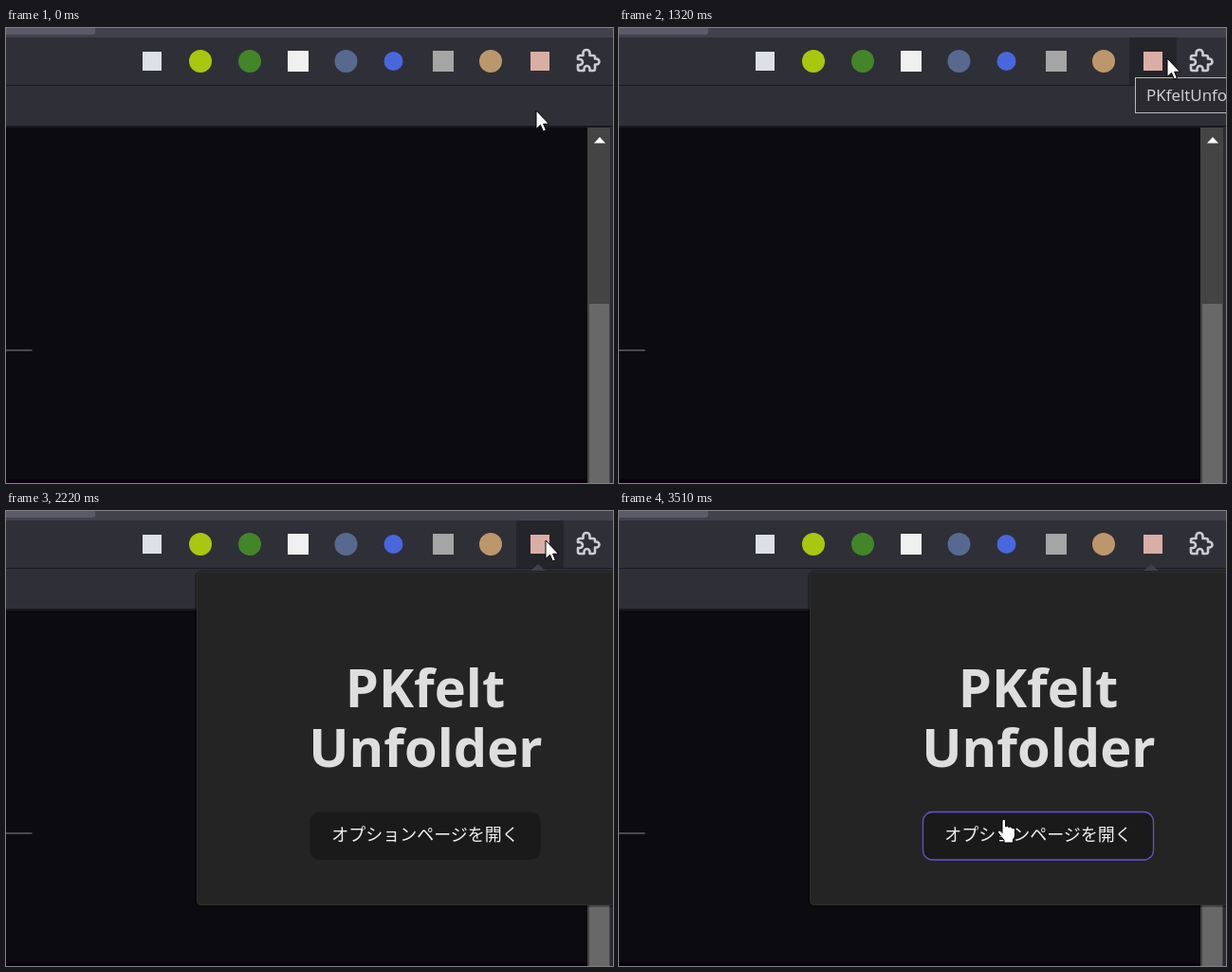
Recreate the animation shown at these times as an HTML page. Size 640 by 480 pixels, loop 3800 ms.

```html
<!DOCTYPE html>
<html lang="ja">
<head>
<meta charset="utf-8">
<title>Extension popup</title>
<style>
  html, body { margin: 0; width: 100%; height: 100%; overflow: hidden; background: #0c0b10; }
  svg { display: block; width: 100%; height: 100%; }
  .title { font: bold 56px "Open Sans", sans-serif; fill: #dedede; text-anchor: middle; }
  .label { font: 18px "Noto Sans CJK JP", "Noto Sans CJK", sans-serif; fill: #f0f0f0; text-anchor: middle; }
  .tip { font: 17px "Open Sans", sans-serif; fill: #d6d6da; }
</style>
</head>
<body>
<svg viewBox="0 0 640 480">
  <!-- browser chrome -->
  <rect width="640" height="10" fill="#42414c"/>
  <path d="M0 0H94V4Q94 7 91 7H0Z" fill="#5b5a66"/>
  <rect y="10" width="640" height="94" fill="#2f2f37"/>
  <rect y="60" width="640" height="1" fill="#1c1b21"/>
  <rect id="hover" y="10" height="50" fill="#24242b"/>

  <!-- toolbar icons -->
  <rect x="144" y="25" width="20" height="20" fill="#dde0e4"/>
  <circle cx="205" cy="35" r="12" fill="#a9c70f"/>
  <circle cx="257" cy="35" r="12" fill="#438529"/>
  <rect x="297" y="24" width="22" height="22" fill="#f0f0f0"/>
  <circle cx="358.500" cy="35" r="12" fill="#586990"/>
  <circle cx="408.500" cy="35" r="10" fill="#4967dc"/>
  <rect x="450" y="24" width="22" height="22" fill="#a5a5a5"/>
  <circle cx="511" cy="35" r="12" fill="#bd976c"/>
  <rect x="553" y="25" width="20" height="20" fill="#d9aea5"/>
  <path fill="none" stroke="#cbcbd1" stroke-width="2.6" stroke-linejoin="round"
    d="M603 33V31Q603 29 605 29H608.500V26.500a3.500 3.500 0 0 1 7 0V29H619q2 0 2 2V32.500H622.500a3 3 0 0 1 0 6H621V43q0 2-2 2H615.500V43a3 3 0 0 0-6 0V45H605q-2 0-2-2V39h2a3 3 0 0 0 0-6Z"/>

  <!-- page and scrollbar -->
  <rect y="103" width="640" height="377" fill="#19181e"/>
  <rect y="105" width="613" height="371" fill="#0c0b10"/>
  <rect y="476" width="613" height="4" fill="#0c0010"/>
  <rect y="339.500" width="27.500" height="1" fill="#858588"/>
  <rect x="613" y="105" width="24" height="375" fill="#444"/>
  <rect x="615" y="291" width="21" height="189" fill="#686868"/>
  <rect x="637" y="104" width="3" height="376" fill="#2b2a33"/>
  <path d="M620 121.500L626 115L632 121.500Z" fill="#fff"/>

  <!-- tooltip -->
  <g id="tooltip">
    <rect x="544.500" y="52.500" width="190" height="37" fill="#2b2a30" stroke="#b9b9bd"/>
    <text class="tip" x="556" y="77">PKfeltUnfolder</text>
  </g>

  <!-- popup -->
  <g id="frame" fill="none">
    <rect x="200" y="63.500" width="460" height="353.500" rx="6" stroke="#000" stroke-opacity=".3" stroke-width="2"/>
    <rect x="201.500" y="65" width="460" height="350.500" rx="4" stroke="#1d1d22"/>
    <path d="M553 63L561 56L569 63Z" fill="#414048"/>
  </g>
  <g id="popup">
    <rect x="201.500" y="64.500" width="460" height="351" rx="4" fill="#242424" stroke="#2d2d2f"/>
    <text class="title" x="442" y="207">PKfelt</text>
    <text class="title" x="442.500" y="270">Unfolder</text>
    <rect id="button" x="320.500" y="317.500" width="243" height="50.500" rx="10" fill="#1a1a1a" stroke="#6b4fcb" stroke-width="1.300"/>
    <text class="label" x="442" y="348">オプションページを開く</text>
  </g>

  <!-- pointers, tip at the origin -->
  <path id="arrow" fill="#fff" stroke="#000" stroke-width="1" d="M0 0V19.500L4.500 15.300L7.400 22L10.400 20.700L7.600 14.200H13.500Z"/>
  <path id="hand" fill="#fff" stroke="#000" stroke-width="1"
    d="M0 1.500Q1.800-1 3.600 1.500V8Q5.500 6.500 7 8.500Q9 7.300 10.300 9.500Q13 8.700 13.500 11.500V17Q13.500 19.500 11.500 21.500V25H2V22Q-1 19-4.500 14Q-5 11.500-2.500 12L0 14.500Z"/>
</svg>
<script>
const LOOP = 3800, STEP = 30;
const TOOLTIP_ON = 1320, CLICK = 2040, POPUP_ON = 2220, BUTTON_ENTER = 3210;

const smooth = u => u * u * (3 - 2 * u);
const linear = u => u;
const slowDown = u => 1 - (1 - u) ** 1.5;
const clamp = u => Math.min(1, Math.max(0, u));
const progress = (t, from, to) => clamp((t - from) / (to - from));

// Each move: start, end, destination, easing
const START = [559, 87];
const MOVES = [
  [0, 360, [595, 34], smooth],
  [510, 660, [578, 32], smooth],
  [1560, 1650, [569, 31], smooth],
  [2670, 2790, [516, 107], linear],
  [2790, 3210, [404, 325], slowDown],
];

const el = id => document.getElementById(id);
const [hover, tooltip, frame, popup, button, arrow, hand] =
  ["hover", "tooltip", "frame", "popup", "button", "arrow", "hand"].map(el);
const show = (node, on) => node.setAttribute("visibility", on ? "visible" : "hidden");

function pointerAt(t) {
  return MOVES.reduce(([x, y], [from, to, [endX, endY], ease]) => {
    const u = ease(progress(t, from, to));
    return [x + (endX - x) * u, y + (endY - y) * u];
  }, START);
}

function draw(now) {
  const t = Math.floor((now % LOOP) / STEP) * STEP;
  const [x, y] = pointerAt(t);
  const onButton = t >= BUTTON_ENTER;

  show(hover, y < 60);
  hover.setAttribute("x", x < 588 ? 538 : 588);
  hover.setAttribute("width", x < 588 ? 50 : 52);

  show(tooltip, t >= TOOLTIP_ON && t < CLICK);
  frame.setAttribute("opacity", progress(t, CLICK + STEP, POPUP_ON - STEP));
  show(popup, t >= POPUP_ON);
  button.setAttribute("stroke-opacity", smooth(progress(t, BUTTON_ENTER, 3480)));

  show(arrow, !onButton);
  show(hand, onButton);
  arrow.setAttribute("transform", `translate(${x} ${y})`);
  hand.setAttribute("transform", `translate(${x} ${y})`);
}

const began = performance.now();
function tick() {
  draw(performance.now() - began);
  requestAnimationFrame(tick);
}
tick();
</script>
</body>
</html>
```
